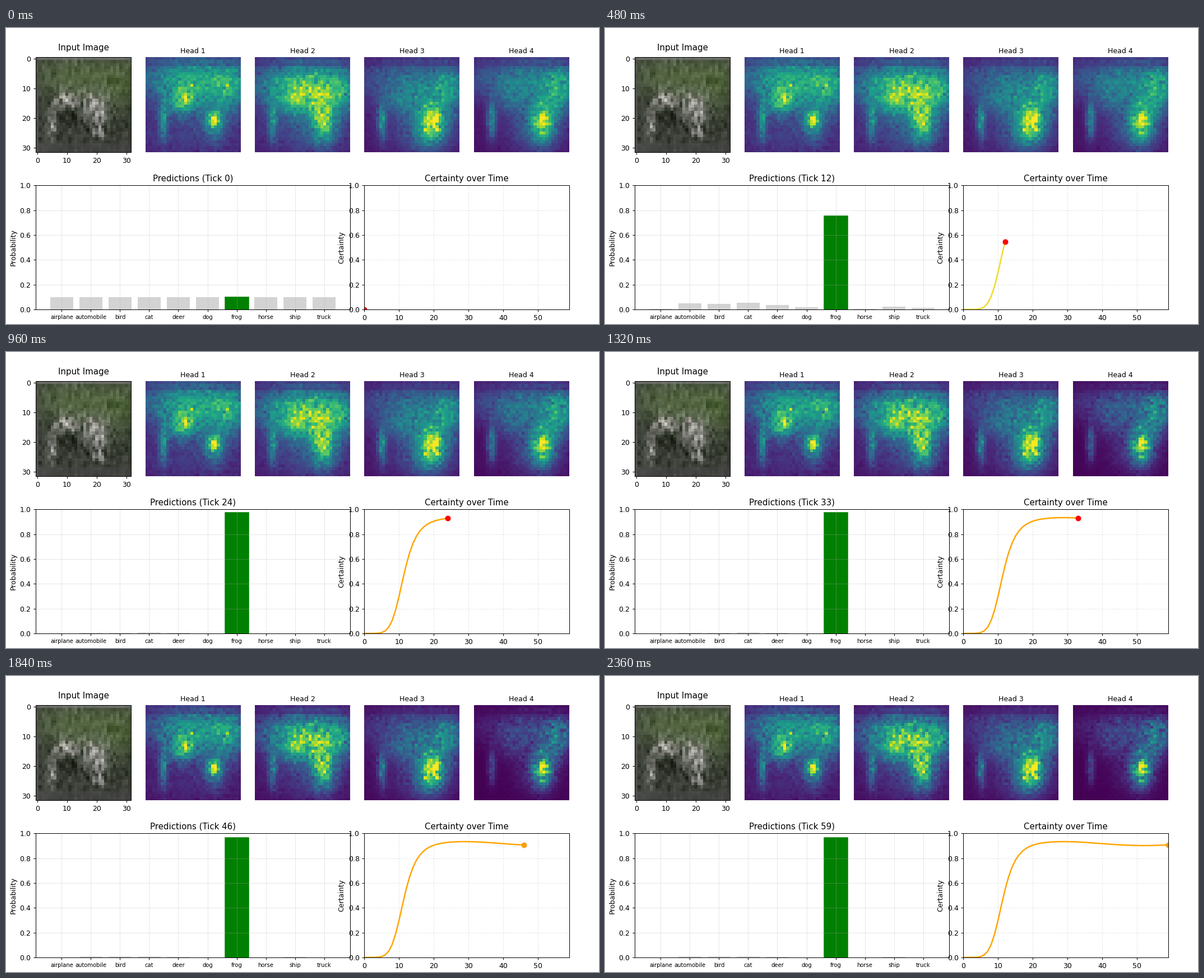
Write a matplotlib script that moves like this. It is 1058 px wide and 529 px high and loops after 2400 ms.

```python
import numpy as np
import matplotlib.pyplot as plt
from matplotlib.animation import FuncAnimation

W, H, DPI = 1058, 529, 90
TICKS, N = 60, 32
CLASSES = ["airplane", "automobile", "bird", "cat", "deer",
           "dog", "frog", "horse", "ship", "truck"]
FROG = CLASSES.index("frog")

rng = np.random.default_rng(11)
rows, cols = np.mgrid[:N, :N]
ticks = np.arange(TICKS)


def blob(r, c, h, w):
    return np.exp(-((rows - r) / h) ** 2 - ((cols - c) / w) ** 2)


# Parts of the scene that the picture and all heads share
haze = blob(6, 16, 7, 20)
band = blob(12, 18, 7, 15)
right = blob(11, 28, 8, 5)
chest = blob(14.5, 12, 4, 4.5)
leg = blob(21, 5.5, 6, 1.5)
hind = blob(21.5, 22.5, 6, 3.5)
hot = blob(20.5, 22.5, 2.5, 2)
halo = blob(23, 21, 9, 8)
floor = blob(24, 16, 9, 18)


def speckle(level):
    return level * rng.standard_normal((N, N))


def head(base, field):
    m = (base + field) * (1 + speckle(.12))
    m[2] *= .8
    return np.clip(m / np.sort(m, axis=None)[-4], 0, 1)


HEADS = [
    head(.08, .4 * haze + .2 * band + .2 * right + .4 * chest + .35 * leg
         + .3 * hind + .4 * hot + .1 * floor),
    head(.06, .35 * haze + .6 * band + .15 * right + .15 * chest + .4 * leg
         + .55 * hind + .15 * halo + .15 * floor),
    head(.04, .22 * haze + .2 * band + .25 * right + .12 * chest + .35 * leg
         + .5 * hind + .3 * halo + .08 * floor),
    head(.03, .3 * haze + .15 * band + .35 * right + .1 * chest + .35 * leg
         + .5 * hind + .1 * hot + .25 * halo + .05 * floor),
]
SHARPEN = [.3, .35, .35, 1]


def make_picture():
    """A pale, mottled shape on muted green."""
    grain = speckle(1)
    grain = (grain + np.roll(grain, 1, axis=0)) / 1.4
    shade = 62 + 22 * haze - 14 * halo - 22 * blob(19, 10, 4, 6) + 9 * grain
    pale = (95 * blob(21, 5, 5, 1.3) + 70 * blob(14, 9.5, 3, 3)
            + 75 * blob(18, 20, 4, 4) + 70 * blob(25, 20.5, 3, 2.5)
            + 35 * blob(14, 15, 4, 8)) * (1 + .4 * grain)
    light = shade + np.maximum(pale, 0)
    green = 4 + 14 * haze + 8 * right
    img = np.stack([light, light + green * (pale < 40), light - green], axis=-1)
    img[0] = img[0] * .4 + 78
    img[29:] = img[29:] * .4 + 43
    img[:, 0] = img[:, 0] * .4 + 52
    return np.clip(img, 0, 255).astype(np.uint8)


# Certainty climbs as a Hill curve to a slowly waving plateau
plateau = .92 + .018 * np.cos(2 * np.pi * (ticks - 26) / 52)
certainty = plateau * ticks ** 6 / (ticks ** 6 + 11.25 ** 6)

# Class odds raised to the power whose entropy matches the certainty
odds = np.array([.004, .05, .048, .057, .037, .02, .755, .004, .025, .012])


def sharpen_odds(power):
    p = odds ** np.asarray(power)[:, None]
    return p / p.sum(axis=1, keepdims=True)


powers = np.linspace(0, 3, 400)
table = sharpen_odds(powers)
sureness = 1 + (table * np.log(table)).sum(axis=1) / np.log(len(odds))
probs = sharpen_odds(np.interp(certainty, sureness, powers))

# Attention narrows around the middle of the run
focus = 1 / (1 + np.exp(-(ticks - 32) / 5))

# Layout in pixels
LEFT, TOP, SIDE, STEP = 53.1, 52.3, 169.9, 195.45
LOW, TALL = 281.3, 221.6
fig = plt.figure(figsize=(W / DPI, H / DPI), dpi=DPI)


def axes(x, y, w, h):
    return fig.add_axes([x / W, 1 - (y + h) / H, w / W, h / H])


ax_in = axes(LEFT, TOP, SIDE, SIDE)
ax_in.imshow(make_picture(), aspect="auto")
ax_in.set_title("Input Image", pad=10)

maps = []
for k, m in enumerate(HEADS, 1):
    ax = axes(LEFT + STEP * k, TOP, SIDE, SIDE)
    maps.append(ax.imshow(m, cmap="viridis", vmin=0, vmax=1, aspect="auto"))
    ax.set_title(f"Head {k}", fontsize=10)
    ax.axis("off")

ax_bar = axes(LEFT, LOW, 2 * STEP + SIDE, TALL)
bars = ax_bar.bar(range(10), probs[0], color="lightgray")
bars[FROG].set(facecolor="green", edgecolor="green", linewidth=2)
ax_bar.set_xticks(range(10), CLASSES, fontsize=8)
ax_bar.set_xlim(-.89, 9.89)
ax_bar.set_ylim(0, 1)
ax_bar.set_ylabel("Probability")
ax_bar.grid(alpha=.3)
title = ax_bar.set_title("")

ax_line = axes(LEFT + 3 * STEP, LOW, STEP + SIDE, TALL)
ax_line.set_xlim(0, TICKS - 1)
ax_line.set_ylim(0, 1)
ax_line.set_title("Certainty over Time")
ax_line.set_xlabel("Tick")
ax_line.set_ylabel("Certainty")
ax_line.grid(alpha=.3, linestyle="--")
line, = ax_line.plot([], [], lw=2)
dot, = ax_line.plot([], [], "o", ms=7)


def update(n):
    for im, m, s in zip(maps, HEADS, SHARPEN):
        im.set_data(m ** (1 + s * focus[n]))
    for bar, p in zip(bars, probs[n]):
        bar.set_height(p)
    title.set_text(f"Predictions (Tick {n})")
    line.set_data(ticks[:n + 1], certainty[:n + 1])
    line.set_color("#f2da2a" if n < 18 else "orange")
    dot.set_data([n], [certainty[n]])
    dot.set_color("red" if n < 37 else "#f99f11")
    return [*maps, *bars, title, line, dot]


anim = FuncAnimation(fig, update, frames=TICKS, interval=40, repeat=True)
plt.show()
```
